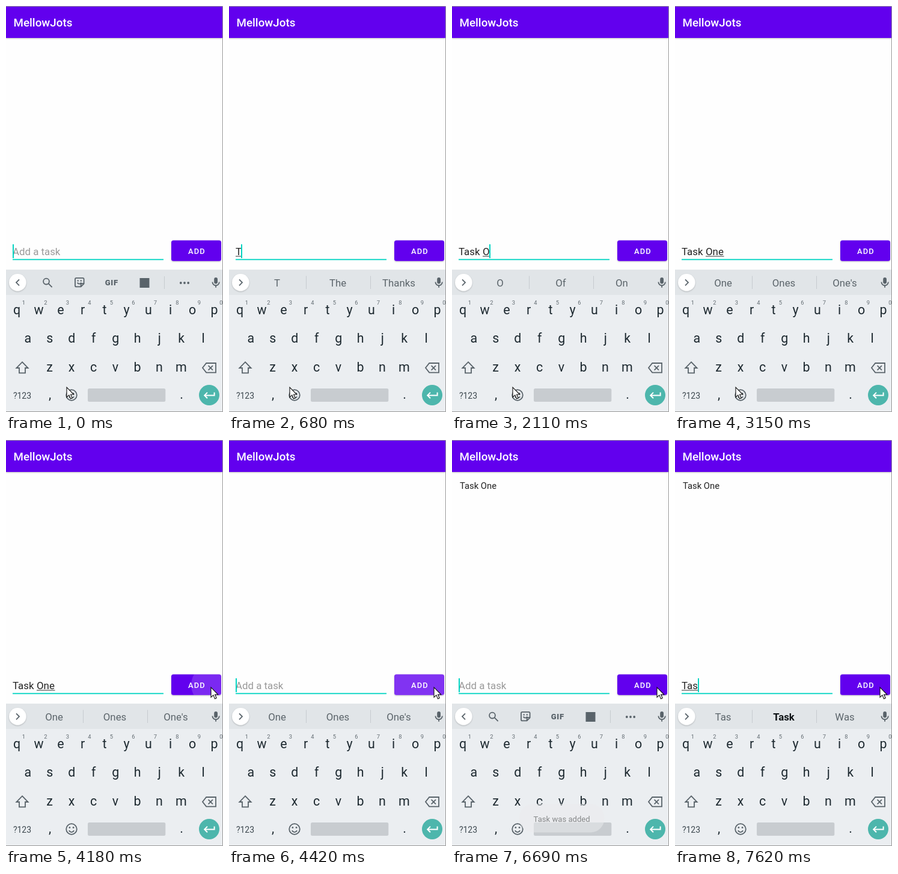
Animation of 361x673 px, one loop 8000 ms. Source, as an HTML page:

```html
<!DOCTYPE html>
<html lang="en">
<head>
<meta charset="utf-8">
<title>To-do list</title>
<style>
  html, body { margin: 0; width: 100%; height: 100%; overflow: hidden; background: #fefefe; }
  svg { display: block; width: 361px; height: 673px; font-family: Roboto, "Noto Sans", sans-serif; }
  text { white-space: pre; }
  .mid { text-anchor: middle; }
  .key { font-size: 21.4px; fill: #1d2930; }
  .sup { font-size: 9.4px; fill: #626b71; }
  .word { font-size: 16.8px; fill: #5b646a; }
  .word.best { font-weight: 700; fill: #0c1114; }
  .field { font-size: 16.85px; fill: #222; }
  .line { fill: none; stroke: #59636a; stroke-width: 1.8; }
  .solid { fill: #59636a; }
  .rule { stroke: #c6cbcf; stroke-width: 1; }
</style>
</head>
<body>
<svg viewBox="0 0 361 673">
  <defs>
    <filter id="soft" x="-30%" y="-30%" width="160%" height="170%">
      <feDropShadow dx="0" dy="1" stdDeviation="1" flood-opacity=".25"/>
    </filter>
    <clipPath id="btnClip"><rect x="275" y="388.5" width="83" height="34.3" rx="3.6"/></clipPath>
  </defs>
  <rect width="361" height="673" fill="#fefefe"/>

  <!-- app bar -->
  <rect y="1" width="360" height="52" fill="#6200ee" filter="url(#soft)"/>
  <text x="12.5" y="34.2" font-size="18.8" font-weight="500" fill="#fff">MellowJots</text>
  <text id="item" x="13" y="81.3" font-size="14.8" fill="#222">Task One</text>

  <!-- input row -->
  <text id="hint" class="field" x="11" y="413" style="fill:#999">Add a task</text>
  <text class="field" x="11" y="413" id="done"></text>
  <text class="field" y="413" id="typing"></text>
  <rect id="under" y="414.4" height="1" fill="#333"/>
  <rect x="11" y="419.4" width="251" height="1.8" fill="#03d5c3"/>
  <rect id="caret" y="395" width="2" height="23" fill="#03d5c3"/>
  <rect x="275" y="388.5" width="83" height="34.3" rx="3.6" fill="#6200ee" filter="url(#soft)"/>
  <g clip-path="url(#btnClip)"><circle id="ripple" cx="342" cy="406" fill="#fff"/></g>
  <text class="mid" x="317.4" y="410.6" font-size="12.9" font-weight="500" letter-spacing="1.15" fill="#fff">ADD</text>

  <!-- keyboard -->
  <rect y="437" width="361" height="236" fill="#ebeef1"/>
  <rect y="437" width="361" height="42" fill="#e1e5e8"/>
  <circle cx="19.3" cy="458.3" r="14.2" fill="#fff" filter="url(#soft)"/>
  <path id="chevron" class="line"/>
  <g id="tools">
    <circle class="line" cx="67" cy="456.6" r="4.9"/>
    <path class="line" stroke-width="2" d="M70.6 460.2L76.6 466.2"/>
    <path class="line" stroke-width="1.6" d="M117 450.8h10.6a2 2 0 0 1 2 2v7.6l-5 5h-7.6a2 2 0 0 1-2-2v-10.600a2 2 0 0 1 2-2zM129.600 460.200h-3a2 2 0 0 0-2 2v3M118.600 458.600q3.400 4.200 6.800 0"/>
    <circle class="solid" cx="119.700" cy="455.400" r="1.200"/>
    <circle class="solid" cx="124.800" cy="455.400" r="1.200"/>
    <text class="solid mid" x="175.800" y="462.800" font-size="13" font-weight="900" letter-spacing=".7">GIF</text>
    <rect class="solid" x="222.500" y="451" width="16" height="16"/>
    <path class="rule" d="M263.500 448v21"/>
    <g class="solid">
      <circle cx="290.800" cy="459" r="1.900"/><circle cx="297" cy="459" r="1.900"/><circle cx="303.200" cy="459" r="1.900"/>
    </g>
  </g>
  <g id="words">
    <path class="rule" d="M128.500 447.500v21.500M235.500 447.500v21.500"/>
  </g>
  <rect class="solid" x="346.200" y="450" width="5.800" height="10.500" rx="2.900"/>
  <path class="line" stroke-width="1.600" d="M343.400 457.500a5.700 5.700 0 0 0 11.400 0M349.100 463.200v3.600"/>
  <g id="keys"></g>
  <path class="line" d="M27 590.200L36.600 600H32V608.400H22V600H17.400Z"/>
  <path class="line" d="M333.200 592H349V607.600H333.200L327 599.800ZM336.600 596.200l7.400 7.400M344 596.200l-7.400 7.400"/>
  <text class="mid" x="27" y="650.500" font-size="14" fill="#3d484f">?123</text>
  <text class="key mid" x="73" y="651">,</text>
  <text class="key mid" x="292" y="651">.</text>
  <circle class="line" cx="109" cy="645" r="8.800"/>
  <path class="line" d="M104.700 647.400q4.300 5.400 8.600 0"/>
  <circle class="solid" cx="105.900" cy="642.400" r="1.400"/>
  <circle class="solid" cx="112.100" cy="642.400" r="1.400"/>
  <rect x="136" y="634" width="129.300" height="22" rx="2.500" fill="#c8ccd0"/>
  <circle cx="338" cy="645" r="17" fill="#4db6ac"/>
  <path d="M346.600 640.600v4.800H330.600M335 640.600l-4.800 4.800l4.800 4.800" fill="none" stroke="#fff" stroke-width="2"/>

  <g id="toast">
    <rect x="111.500" y="603" width="142" height="47.500" rx="23" fill="#ebecee"/>
    <text class="mid" x="182.600" y="632.500" font-size="13.100" fill="#222">Task was added</text>
  </g>
  <path d="M0 .5H360.500V672.500H0" fill="none" stroke="#999"/>
  <path id="mouse" d="M0 0V16.500L3.900 12.900L6.500 19L9.200 17.800L6.600 12H11.800Z" fill="#fff" stroke="#111" stroke-width="1.100"/>
</svg>
<script>
const LOOP = 8000;
const $ = id => document.getElementById(id);
const NS = 'http://www.w3.org/2000/svg';

function addText(parent, cls, x, y, str) {
  const t = document.createElementNS(NS, 'text');
  t.setAttribute('class', cls);
  t.setAttribute('x', x);
  t.setAttribute('y', y);
  t.textContent = str;
  return parent.appendChild(t);
}

const rows = [['qwertyuiop', 18, 510.5], ['asdfghjkl', 36.2, 557.5], ['zxcvbnm', 72.5, 605.5]];
for (const [letters, x0, y] of rows) {
  [...letters].forEach((c, i) => {
    const x = x0 + i * 36.5;
    addText($('keys'), 'key mid', x, y, c);
    if (y < 520) addText($('keys'), 'sup mid', x + 11.3, 495.4, (i + 1) % 10);
  });
}
const slots = [80, 181, 282.5].map(x => addText($('words'), 'word mid', x, 465, ''));

// Each step holds until the next one: [start, changed values]
const steps = [
  [0, { done: '', typing: '', caret: 11, on: 1, words: '', item: 0, toast: 0, ripple: [0, 0], mouse: [101, 632] }],
  [560, { typing: 'T', caret: 20 }],
  [680, { words: 'T The Thanks' }],
  [1050, { typing: 'Ta', caret: 29, words: 'Ta Take Tap' }],
  [1310, { typing: 'Tas', caret: 38, words: 'Tas *Task Was' }],
  [1430, { typing: 'Task', caret: 47, words: 'Task Tasks Talk' }],
  [1690, { done: 'Task ', typing: '', caret: 50, words: 'is and to' }],
  [2110, { typing: 'O', caret: 62, words: 'O Of On' }],
  [2500, { typing: 'On', caret: 71, words: 'On One In' }],
  [2620, { typing: 'One', caret: 81, words: "One Ones One's" }],
  [3150, { on: 0 }],
  [3270, { mouse: [132, 606] }],
  [3390, { mouse: [222, 528] }],
  [3510, { mouse: [304, 456] }],
  [3630, { mouse: [337, 427], on: 1 }],
  [3780, { mouse: [340, 416] }],
  [3900, { mouse: [341, 410] }],
  [4180, { on: 0, ripple: [34, .16] }],
  [4300, { ripple: [62, .2] }],
  [4420, { done: '', typing: '', caret: 11, on: 1, ripple: [80, .2] }],
  [4570, { item: 1, words: '', toast: .35, ripple: [80, .1] }],
  [4690, { toast: .75, ripple: [0, 0] }],
  [4840, { toast: .92 }],
  [4960, { toast: 1, on: 0 }],
  [5360, { on: 1 }],
  [5920, { on: 0 }],
  [6420, { on: 1 }],
  [6570, { toast: .8 }],
  [6690, { toast: .5 }],
  [6810, { toast: .2, typing: 'T', caret: 20 }],
  [6930, { toast: 0, words: 'T The Thanks' }],
  [7080, { typing: 'Ta', caret: 29, words: 'Ta Take Tap' }],
  [7620, { typing: 'Tas', caret: 38, words: 'Tas *Task Was' }]
];
let last = {};
const states = steps.map(([at, change]) => [at, last = { ...last, ...change }]);

const show = (id, on) => { $(id).style.display = on ? '' : 'none'; };

function render(s) {
  show('item', s.item);
  show('hint', !s.done && !s.typing);
  show('caret', s.on);
  show('under', s.typing);
  show('tools', !s.words);
  show('words', s.words);

  const start = s.done ? 51 : 11;
  $('done').textContent = s.done;
  $('typing').textContent = s.typing;
  $('typing').setAttribute('x', start);
  $('under').setAttribute('x', start);
  $('under').setAttribute('width', Math.max(0, s.caret - start + .5));
  $('caret').setAttribute('x', s.caret);

  $('chevron').setAttribute('d', s.words ? 'M17 453.300l5 5l-5 5' : 'M22 453.300l-5 5l5 5');
  const words = s.words.split(' ');
  slots.forEach((slot, i) => {
    const w = words[i] || '';
    slot.classList.toggle('best', w[0] === '*');
    slot.textContent = w.replace('*', '');
  });

  $('toast').setAttribute('opacity', s.toast);
  $('ripple').setAttribute('r', s.ripple[0]);
  $('ripple').setAttribute('opacity', s.ripple[1]);
  $('mouse').setAttribute('transform', `translate(${s.mouse})`);
}

const origin = performance.now();
let shown = null;
function tick() {
  const t = (performance.now() - origin) % LOOP;
  const state = states.findLast(([at]) => at <= t)[1];
  if (state !== shown) render(shown = state);
  requestAnimationFrame(tick);
}
tick();
</script>
</body>
</html>
```
